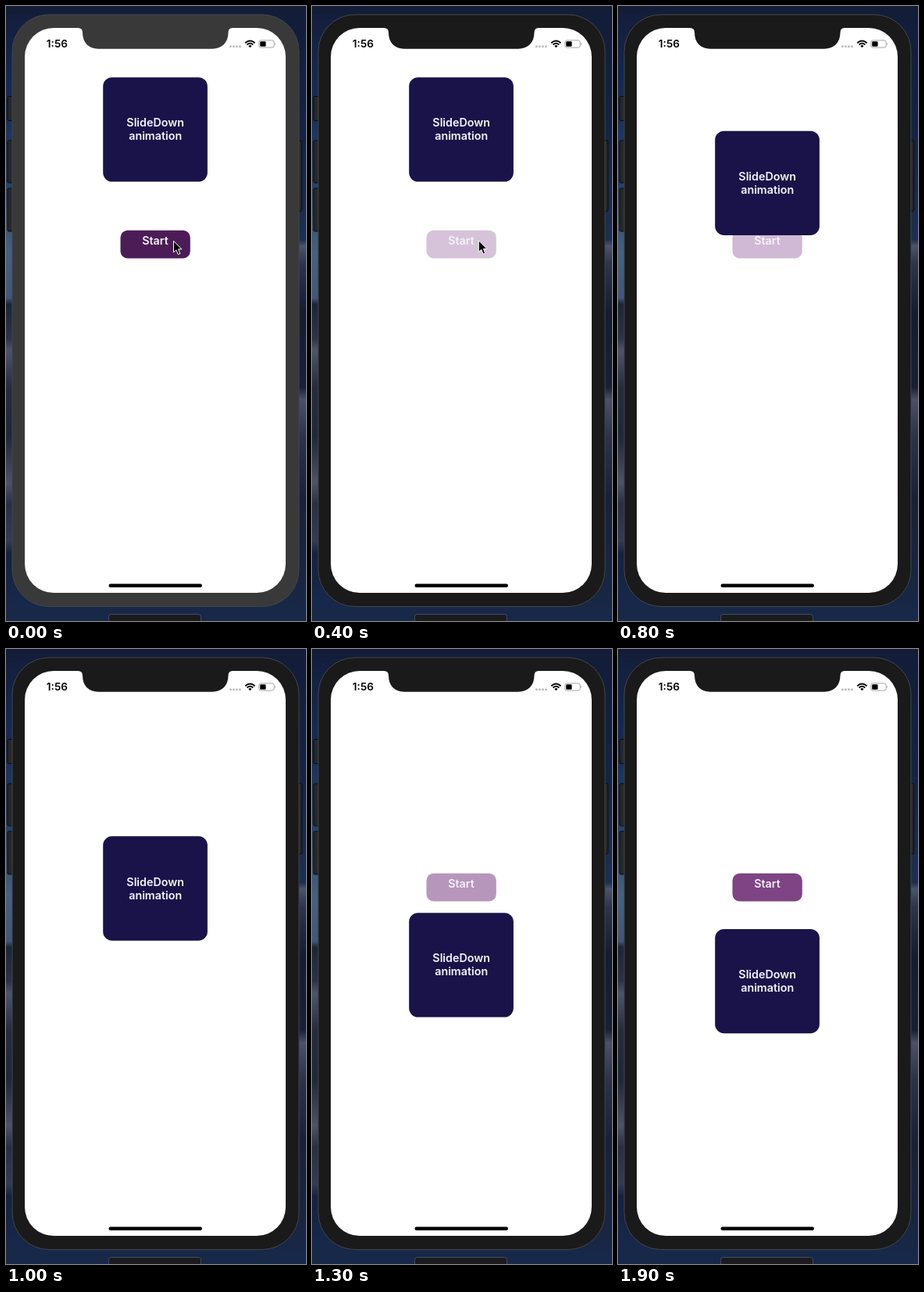
An HTML page for the animation above (2 s loop, 384 px wide and 786 px high).

```html
<!DOCTYPE html>
<html lang="en">
<head>
<meta charset="utf-8">
<title>SlideDown animation</title>
<style>
  html, body { margin: 0; width: 100%; height: 100%; overflow: hidden; background: #15233f; }
  svg { display: block; width: 384px; height: 786px; }
  text { font: 600 14.3px Inter, "Noto Sans", sans-serif; fill: #f4f3f8; text-anchor: middle; }
  .clock { font-size: 13.6px; fill: #000; }
</style>
</head>
<body>
<svg viewBox="0 0 384 786">
  <defs>
    <linearGradient id="leftSky" x2="0" y2="1">
      <stop offset="0" stop-color="#131d38"/>
      <stop offset=".14" stop-color="#152a54"/>
      <stop offset=".3" stop-color="#27446d"/>
      <stop offset=".4" stop-color="#46617f"/>
      <stop offset=".475" stop-color="#40577a"/>
      <stop offset=".485" stop-color="#1c2538"/>
      <stop offset=".54" stop-color="#2c3348"/>
      <stop offset=".56" stop-color="#4d556d"/>
      <stop offset=".62" stop-color="#252c40"/>
      <stop offset=".7" stop-color="#1f273a"/>
      <stop offset=".775" stop-color="#4c536a"/>
      <stop offset=".81" stop-color="#272f45"/>
      <stop offset=".87" stop-color="#343c54"/>
      <stop offset=".89" stop-color="#15223f"/>
      <stop offset="1" stop-color="#172a4e"/>
    </linearGradient>
    <linearGradient id="rightSky" x2="0" y2="1">
      <stop offset="0" stop-color="#111c38"/>
      <stop offset=".2" stop-color="#142344"/>
      <stop offset=".38" stop-color="#1c2f52"/>
      <stop offset=".39" stop-color="#4b546c"/>
      <stop offset=".42" stop-color="#2c344a"/>
      <stop offset=".5" stop-color="#141c30"/>
      <stop offset=".62" stop-color="#182036"/>
      <stop offset=".64" stop-color="#4a5168"/>
      <stop offset=".7" stop-color="#2b3349"/>
      <stop offset=".8" stop-color="#182138"/>
      <stop offset="1" stop-color="#182847"/>
    </linearGradient>
  </defs>

  <rect width="192" height="786" fill="url(#leftSky)"/>
  <rect x="192" width="192" height="786" fill="url(#rightSky)"/>
  <rect y="768" width="384" height="18" fill="#172848"/>
  <rect width="384" height="11" fill="#131d38"/>
  <rect x="131.5" y="777.5" width="118" height="14" rx="3" fill="#1b1b1d" stroke="#50586a" stroke-width=".8"/>

  <g fill="#262829" stroke="#090b0f">
    <rect x="2" y="115.5" width="9" height="31" rx="1.5"/>
    <rect x="2" y="172" width="9" height="54" rx="1.5"/>
    <rect x="2" y="233" width="9" height="55" rx="1.5"/>
    <rect x="370" y="172" width="8.8" height="90" rx="1.5"/>
  </g>
  <rect id="bezel" x="8" y="11" width="367" height="756.5" rx="47" stroke="#44464a"/>
  <rect x="24" y="28" width="334" height="722" rx="37" fill="#fff"/>
  <path id="notch" d="M92 27.5V28Q98 28 98 34C98 47 106 54.7 118 54.7H264C276 54.7 284.500 47 284.500 34Q284.500 28 290 28V27.500Z"/>

  <text class="clock" x="65.400" y="53.300">1:56</text>
  <g fill="#bdbdbd">
    <circle cx="287.400" cy="51.700" r="1.500"/>
    <circle cx="291.400" cy="51.700" r="1.500"/>
    <circle cx="295.400" cy="51.700" r="1.500"/>
    <circle cx="299.400" cy="51.700" r="1.500"/>
  </g>
  <g fill="none" stroke="#000" stroke-width="1.900">
    <path d="M306.300 47.200Q312.400 41.800 318.500 47.200M308.500 49.500Q312.400 46.200 316.300 49.500"/>
    <path d="M310.300 50.900Q312.400 49.300 314.500 50.900L312.400 53.200Z" fill="#000" stroke="none"/>
  </g>
  <rect x="323.800" y="43.900" width="19.400" height="9.200" rx="2.600" fill="none" stroke="#999" stroke-width=".9"/>
  <rect x="325.200" y="45.200" width="7.400" height="6.600" rx="1.300"/>
  <path d="M344.300 46.700Q346 48.400 344.300 50.100Z" fill="#888"/>
  <rect x="131.500" y="738.400" width="119.500" height="4.500" rx="2.250"/>

  <rect id="button" x="146.500" y="286.800" width="89.300" height="35.600" rx="9"/>
  <text x="191" y="305">Start</text>
  <g id="card">
    <rect x="124.200" y="91.200" width="133.700" height="133.300" rx="11.500" fill="#1a134a"/>
    <text x="191.200" y="154.400">SlideDown</text>
    <text x="191.200" y="171.400">animation</text>
  </g>
  <path id="cursor" d="M0 0V14.500L3.400 11.500L5.800 17.200L8.400 16.100L6 10.500H10.500Z" stroke="#fff" stroke-linejoin="round"/>
</svg>
<script>
  const LOOP = 2000, SLIDE_START = 467, SLIDE_TIME = 1000, SLIDE_DISTANCE = 266.700;
  const byId = id => document.getElementById(id);
  const [bezel, notch, button, card, cursor] =
    ["bezel", "notch", "button", "card", "cursor"].map(byId);

  // Button tint over time: a quick press, then a slow release.
  const tints = [
    [0, 75, 27, 86], [100, 140, 104, 148], [200, 208, 187, 213], [400, 214, 195, 218],
    [800, 207, 185, 212], [1300, 183, 150, 188], [1500, 165, 124, 170], [2000, 116, 54, 122]
  ];

  // cubic-bezier(.42, 0, 1, 1)
  function easeIn(x) {
    let low = 0, high = 1;
    for (let i = 0; i < 24; i++) {
      const s = (low + high) / 2;
      if (1.26 * s + .48 * s * s - .74 * s ** 3 < x) low = s; else high = s;
    }
    return low * low * (3 - 2 * low);
  }
  const easeInOut = t => t < .5 ? easeIn(2 * t) / 2 : 1 - easeIn(2 - 2 * t) / 2;

  function tintAt(t) {
    const next = tints.findIndex(tint => tint[0] > t);
    const from = tints[next - 1], to = tints[next];
    const mix = (t - from[0]) / (to[0] - from[0]);
    return `rgb(${[1, 2, 3].map(i => Math.round(from[i] + (to[i] - from[i]) * mix))})`;
  }

  function draw(t) {
    const progress = Math.min(1, Math.max(0, (t - SLIDE_START) / SLIDE_TIME));
    card.setAttribute("transform", `translate(0 ${SLIDE_DISTANCE * easeInOut(progress)})`);
    button.setAttribute("fill", tintAt(t));
    const frameColor = t < 100 ? "#393939" : "#1a1a1a";
    bezel.setAttribute("fill", frameColor);
    notch.setAttribute("fill", frameColor);
    cursor.setAttribute("transform", t < 100 ? "translate(214.500 300.300)" : "translate(213.300 299.800)");
    cursor.setAttribute("visibility", t < 500 ? "visible" : "hidden");
  }

  const start = performance.now();
  function tick() {
    draw((performance.now() - start) % LOOP);
    requestAnimationFrame(tick);
  }
  tick();
</script>
</body>
</html>
```
